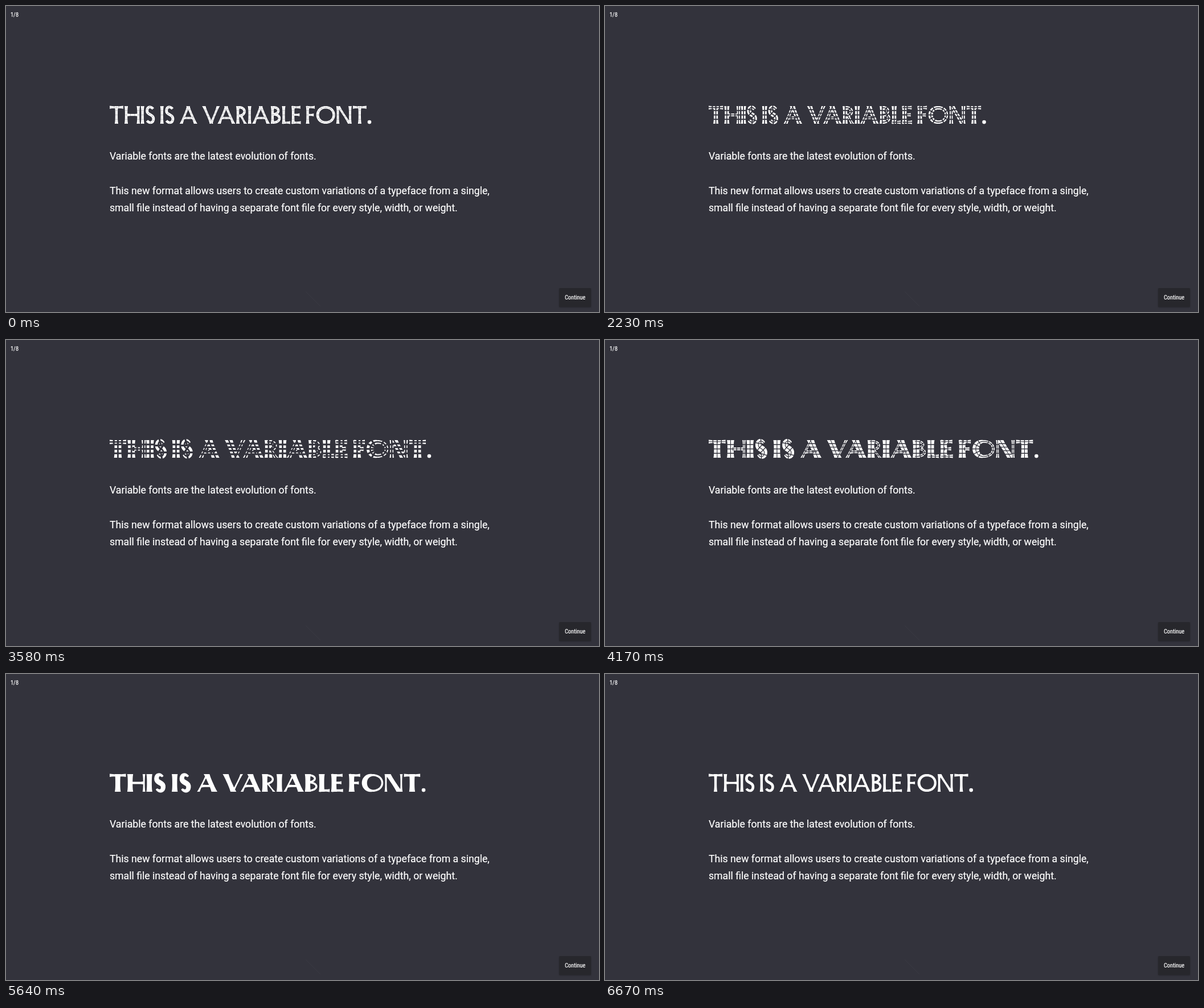
An HTML page that plays this animation: 1041x538 px, repeating every 6770 ms.

```html
<!DOCTYPE html>
<html lang="en">
<head>
<meta charset="utf-8">
<title>Variable font</title>
<style>
  html, body { margin: 0; width: 100%; height: 100%; overflow: hidden; background: #33333c; }
  svg { display: block; width: 1041px; height: 538px; }
  text { fill: #fff; stroke: #fff; stroke-width: .2px; font-family: Roboto, sans-serif; }
  .copy { font-size: 17.68px; }
  .small { font-family: "Roboto Condensed", Roboto, sans-serif; font-stretch: 75%; font-size: 10.3px; }
  .button { fill: #27272c; filter: drop-shadow(0 1px 1px rgba(0, 0, 0, .25)); }
</style>
</head>
<body>
<svg viewBox="0 0 1041 538">
  <rect width="1041" height="538" fill="#33333c"/>
  <path d="M526 502L552 528" stroke="#fff" stroke-opacity=".03"/>
  <g role="img" aria-label="This is a variable font.">
    <path id="ink" fill="#fff"/>
    <path id="inline" fill="#33333c"/>
    <path id="cuts" stroke="#33333c" fill="none"/>
    <circle id="dot" fill="#fff"/>
  </g>
  <text class="copy" x="182" y="270">Variable fonts are the latest evolution of fonts.</text>
  <text class="copy" x="182" y="330.7">This new format allows users to create custom variations of a typeface from a single,</text>
  <text class="copy" x="182" y="361">small file instead of having a separate font file for every style, width, or weight.</text>
  <text class="small" x="8" y="19.3">1/8</text>
  <rect class="button" x="971" y="496" width="56" height="33" rx="1.5"/>
  <text class="small" x="999" y="516" text-anchor="middle">Continue</text>
</svg>
<script>
const LOOP = 6770, STEP = 148.4;
const LEFT = 182, TOP = 176, BOTTOM = 207;
const TITLE = 'THIS IS A VARIABLE FONT';

// Light width, then strokes in a unit box.
// s: main stem, t: thin stem, b: bar, f: swelling curve, c: thin curve.
const GLYPHS = {
  T: [24, 'b0 0 1 0|s.5 0 .5 1'],
  H: [26, 's0 0 0 1|b.1 .5 .95 .5|t1 0 1 1'],
  I: [5, 's.5 0 .5 1'],
  S: [17, 'f.92 .1 .6 -.08 0 -.08 .03 .25 .06 .5 .97 .47 .97 .75 .97 1.08 .3 1.06 .02 .88'],
  A: [30, 't.5 0 0 1|s.46 0 1 1|b.2 .7 .8 .7'],
  V: [30, 's0 0 .54 1|t1 0 .5 1'],
  R: [18, 's0 0 0 1|c.05 0 1.15 -.05 1.15 .57 .1 .56|t.42 .55 1 1'],
  B: [17, 's0 0 0 1|c.05 0 1.1 -.04 1.1 .46 .1 .46|c.1 .46 1.3 .44 1.3 1.02 .05 1'],
  L: [14, 's0 0 0 1|b.05 1 1 1'],
  E: [16, 's0 0 0 1|b.05 0 .96 0|b.05 .49 .86 .49|b.05 1 1 1'],
  F: [15, 's0 0 0 1|b.05 0 1 0|b.05 .5 .88 .5'],
  O: [33, 'f.5 0 -.17 0 -.17 1 .5 1|c.5 0 1.17 0 1.17 1 .5 1'],
  N: [26, 't0 0 0 1|s.02 0 .98 1|t1 0 1 1']
};

// Right edge of the headline over the loop.
const REACH = [[560, 625], [2230, 669], [2980, 725], [4170, 761], [5060, 773], [5790, 723], [6090, 682]];

const strokes = Object.fromEntries(Object.entries(GLYPHS).map(([key, [, def]]) =>
  [key, def.split('|').map(s => ({ kind: s[0], at: s.slice(1).split(' ').map(Number) }))]));
const lerp = (a, b, k) => a + (b - a) * k;
const point = (x, y) => x.toFixed(2) + ' ' + y.toFixed(2);
const set = (id, attrs) => {
  for (const name in attrs) document.getElementById(id).setAttribute(name, attrs[name]);
};

const bezier = (a, b, c, d, s) =>
  lerp(lerp(lerp(a, b, s), lerp(b, c, s), s), lerp(lerp(b, c, s), lerp(c, d, s), s), s);

// Smooth closed curve through the key points.
function reachAt(t) {
  const n = REACH.length;
  const key = i => {
    const [at, value] = REACH[(i + n) % n];
    return [at + LOOP * Math.floor(i / n), value];
  };
  if (t < REACH[0][0]) t += LOOP;
  let i = 0;
  while (key(i + 1)[0] <= t) i++;
  const [p, a, b, q] = [-1, 0, 1, 2].map(k => key(i + k));
  const third = (b[0] - a[0]) / 3;
  const slope = (from, to) => (to[1] - from[1]) / (to[0] - from[0]) * third;
  return bezier(a[1], a[1] + slope(p, b), b[1] - slope(a, q), b[1], (t - a[0]) / (b[0] - a[0]));
}

// Cosine bump around a moment.
function bump(t, middle, half) {
  const d = Math.abs(t - middle) / half;
  return d < 1 ? Math.cos(d * Math.PI / 2) ** 2 : 0;
}

const gapAt = t => 3.8 * bump(t, 3100, 1800) + .8 * bump(t, 700, 1100);

// Letter boxes: widths grow with weight, the tracking fills the line up to its end.
function layout(u, end) {
  const letters = [...TITLE];
  const width = c => c === ' ' ? 0 : GLYPHS[c][0] + 6.2 * u;
  const units = (c, next) => !next ? 0 : /[AV]{2}/.test(c + next) ? -1 : c === ' ' || next === ' ' ? 1.75 : 1;
  const spacing = letters.map((c, i) => units(c, letters[i + 1]));
  const sum = list => list.reduce((a, b) => a + b, 0);
  const track = (end - LEFT - sum(letters.map(width))) / sum(spacing);
  let x = LEFT;
  return letters.map((letter, i) => {
    const box = [x, x + width(letter)];
    x = box[1] + track * spacing[i];
    return { letter, box };
  }).filter(item => item.letter !== ' ');
}

// Returns x, y, normal and half width at a place s along the stroke.
function locate({ kind, at }, box, size, s) {
  const curved = kind === 'f' || kind === 'c';
  const upright = kind === 's' || kind === 't';
  const w = kind === 's' || kind === 'f' ? size.main : kind === 'b' ? size.bar : size.thin;
  const padX = kind === 'b' ? 0 : w / 2;
  const padY = upright ? 0 : (curved ? size.thin : w) / 2;
  const map = (x, y) => [lerp(box[0] + padX, box[1] - padX, x), lerp(TOP + padY, BOTTOM - padY, y)];
  if (!curved) {
    const [x, y] = map(lerp(at[0], at[2], s), lerp(at[1], at[3], s));
    const h = w / 2 - .3 + .9 * Math.abs(2 * s - 1) ** 3;
    return { x, y, nx: upright ? -1 : 0, ny: upright ? 0 : 1, h };
  }
  const spans = (at.length - 2) / 6;
  const spot = s => {
    const i = Math.min(spans - 1, Math.floor(s * spans)), k = s * spans - i;
    const p = at.slice(i * 6, i * 6 + 8);
    return map(bezier(p[0], p[2], p[4], p[6], k), bezier(p[1], p[3], p[5], p[7], k));
  };
  const [x, y] = spot(s), [ax, ay] = spot(Math.max(0, s - .01)), [bx, by] = spot(Math.min(1, s + .01));
  const len = Math.hypot(bx - ax, by - ay) || 1;
  const width = kind === 'f' ? lerp(size.thin, size.main, Math.sin(Math.PI * s)) : w;
  return { x, y, nx: (ay - by) / len, ny: (bx - ax) / len, h: width / 2 };
}

function ribbon(spine, half) {
  const side = sign => spine.map(p => point(p.x + sign * p.nx * half(p), p.y + sign * p.ny * half(p)));
  return 'M' + [...side(1), ...side(-1).reverse()].join('L') + 'Z';
}

function draw(t) {
  const reach = reachAt(t), gap = gapAt(t);
  const u = (reach - 644) / 129;
  // Opening the cuts spreads the strokes.
  const spread = gap * .9;
  const size = {
    main: lerp(4.8, 10.8, u) + spread,
    thin: lerp(4.2, 3.2, u) + spread,
    bar: lerp(4, 4.6, u) + spread * .7
  };
  let ink = '', inline = '', cuts = '';
  for (const { letter, box } of layout(u, reach - 8.5 - u)) {
    for (const stroke of strokes[letter]) {
      const n = stroke.at.length > 4 ? 28 : 10;
      const spine = Array.from({ length: n + 1 }, (_, k) => locate(stroke, box, size, k / n));
      ink += ribbon(spine, p => p.h);
      if (!gap) continue;
      inline += ribbon(spine, p => Math.min(gap * .42, p.h * .6));
      const length = spine.slice(1).reduce((sum, p, k) => sum + Math.hypot(p.x - spine[k].x, p.y - spine[k].y), 0);
      const parts = Math.max(2, Math.round(length / 7));
      for (let k = 1; k < parts; k++) {
        const p = locate(stroke, box, size, k / parts), r = p.h + .4;
        cuts += 'M' + point(p.x - p.nx * r, p.y - p.ny * r) + 'L' + point(p.x + p.nx * r, p.y + p.ny * r);
      }
    }
  }
  set('ink', { d: ink });
  set('inline', { d: inline });
  set('cuts', { d: cuts, 'stroke-width': gap });
  const r = 3.3;
  set('dot', { cx: reach - r, cy: 207.4 - r, r });
}

// The headline moves in short held steps.
const start = performance.now();
let shown = -1;
function tick() {
  const t = (performance.now() - start) % LOOP;
  const step = Math.min(45, Math.floor((t + 12) / STEP));
  if (step !== shown) draw(step * STEP);
  shown = step;
  requestAnimationFrame(tick);
}
tick();
</script>
</body>
</html>
```
